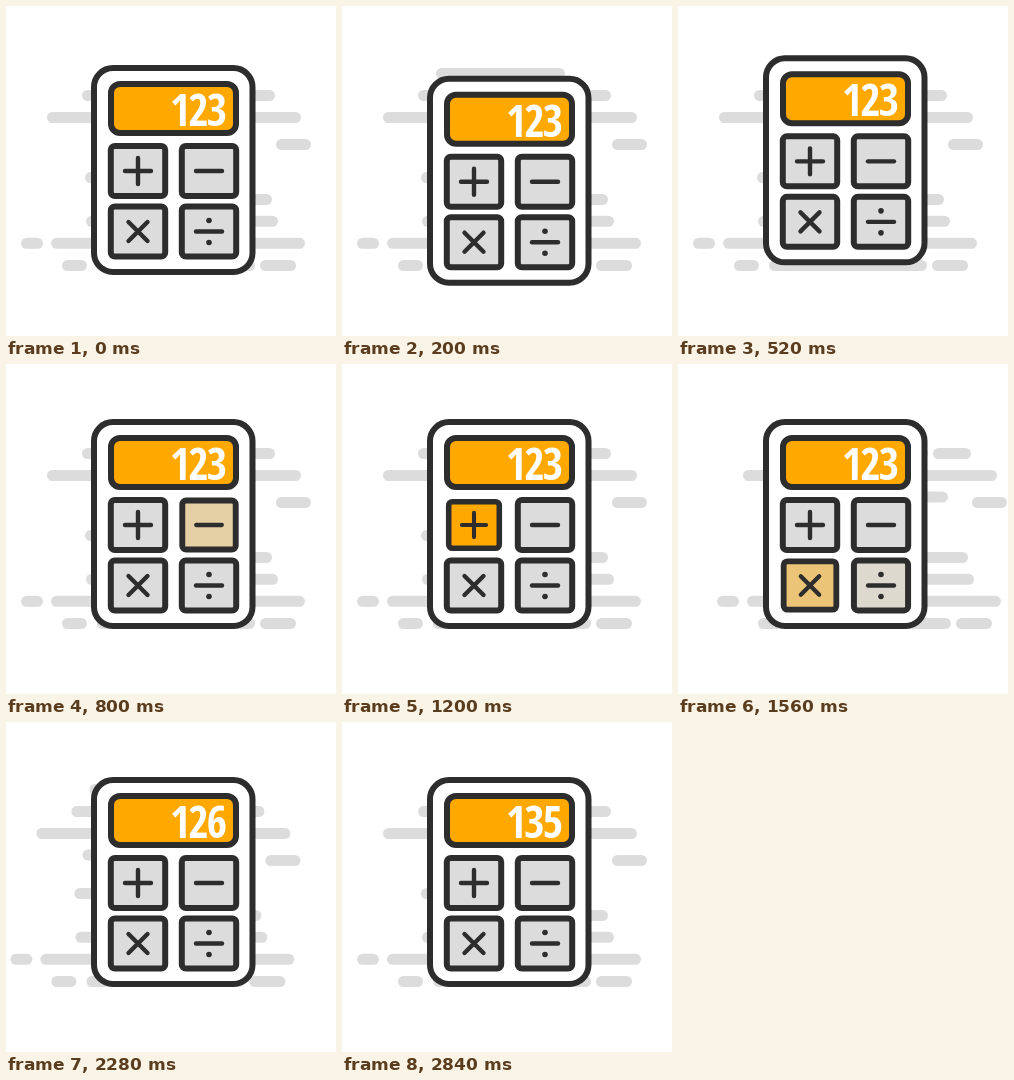
An HTML page that plays this animation: 330x330 px, repeating every 2.88 s.

```html
<!DOCTYPE html>
<html lang="en">
<head>
<meta charset="utf-8">
<title>Calculator</title>
<style>
html, body { margin: 0; width: 100%; height: 100%; overflow: hidden; background: #fff; }
svg { display: block; width: 100vw; height: 100vh; }
.wind { stroke: #dcdcdc; stroke-width: 11; stroke-linecap: round; }
.frame { stroke: #2d2d2d; stroke-width: 6; }
.sign { stroke: #2d2d2d; stroke-width: 4.4; stroke-linecap: round; fill: none; }
text {
  font: 700 44px "Noto Sans ExtraCondensed", "Liberation Sans Narrow", "Open Sans Condensed",
    "Roboto Condensed", "Noto Sans", sans-serif;
  font-stretch: 62.5%;
  letter-spacing: -2px;
  text-anchor: end;
  fill: #fff;
}
</style>
</head>
<body>
<svg viewBox="0 0 330 330">
  <g id="wind" class="wind"></g>
  <g id="calc">
    <rect class="frame" x="88" y="58" width="158.5" height="204" rx="19" fill="#fff"/>
    <rect class="frame" x="105" y="74" width="125" height="49" rx="9" fill="#ffa800"/>
    <text id="value" x="219" y="116">123</text>
  </g>
</svg>
<script>
const LOOP = 2880, STEP = 40;
const GREY = [220, 220, 220], ORANGE = [255, 168, 0];
const $ = id => document.getElementById(id);

function add(parent, tag, attrs) {
  const el = document.createElementNS('http://www.w3.org/2000/svg', tag);
  for (const k in attrs) el.setAttribute(k, attrs[k]);
  return parent.appendChild(el);
}

// y, left end, right end
const streaks = [
  [67.5, 94, 223], [89.5, 76, 226], [89.5, 231, 269], [111.5, 41, 295],
  [133, 87, 246], [138.5, 270, 305], [171.5, 79, 200], [193.5, 110, 266],
  [215.3, 80, 272], [237.3, 15, 37], [237.3, 45, 299],
  [259.5, 56, 81], [259.5, 91, 249], [259.5, 254, 290]
];
for (const [y, a, b] of streaks)
  add($('wind'), 'line', { x1: a + 5.5, x2: b - 5.5, y1: y, y2: y });

// centre, sign path, time of full press
const keys = [
  [203, 161, 'M-13 0H13', 920],
  [132, 161, 'M-13 0H13M0-13V13', 1200],
  [132, 221.5, 'M-9.5-9.5L9.5 9.5M9.5-9.5L-9.5 9.5', 1470],
  [203, 221.5, 'M-13 0H13', 1740]
].map(([x, y, d, peak], i) => {
  const g = add($('calc'), 'g', {});
  const box = add(g, 'rect', { class: 'frame', x: -27.2, y: -25, width: 54.4, height: 50, rx: 4 });
  add(g, 'path', { class: 'sign', d });
  if (i === 3)
    for (const cy of [-11, 11]) add(g, 'circle', { cx: 0, cy, r: 2.8, fill: '#2d2d2d' });
  return { x, y, g, box, peak };
});

const inOut = x => (1 - Math.cos(Math.PI * x)) / 2;
const out = x => 1 - (1 - x) ** 2;

// Each row: time, value, easing used to reach it
const hop = [[0, 4], [345, 17, out], [465, -15, inOut], [560, 0, inOut]];
const drift = [[1200, 0], [1560, 24, inOut], [2060, -13, inOut], [2840, 0, inOut]];

function track(rows, t) {
  if (t <= rows[0][0]) return rows[0][1];
  for (let i = 1; i < rows.length; i++) {
    const [a, from] = rows[i - 1], [b, to, ease] = rows[i];
    if (t < b) return from + (to - from) * ease((t - a) / (b - a));
  }
  return rows[rows.length - 1][1];
}

function press(t, peak) {
  const d = t - peak;
  return d < 0 ? Math.max(0, 1 + d / 240) ** 2 : inOut(Math.max(0, 1 - d / 170));
}

function draw(t) {
  $('calc').setAttribute('transform', `translate(0 ${track(hop, t)})`);
  $('wind').setAttribute('transform', `translate(${track(drift, t)} 0)`);
  for (const k of keys) {
    const p = press(t, k.peak);
    k.g.setAttribute('transform', `translate(${k.x} ${k.y}) scale(${1 - 0.07 * p})`);
    k.box.setAttribute('fill', `rgb(${GREY.map((c, i) => Math.round(c + (ORANGE[i] - c) * p))})`);
  }
  const count = Math.min(1, Math.max(0, (t - 2100) / 720));
  $('value').textContent = 123 + Math.floor(12 * count + 1e-6);
}

const start = performance.now();
function tick() {
  const t = (performance.now() - start) % LOOP;
  draw(Math.floor(t / STEP) * STEP);
  requestAnimationFrame(tick);
}
tick();
</script>
</body>
</html>
```
